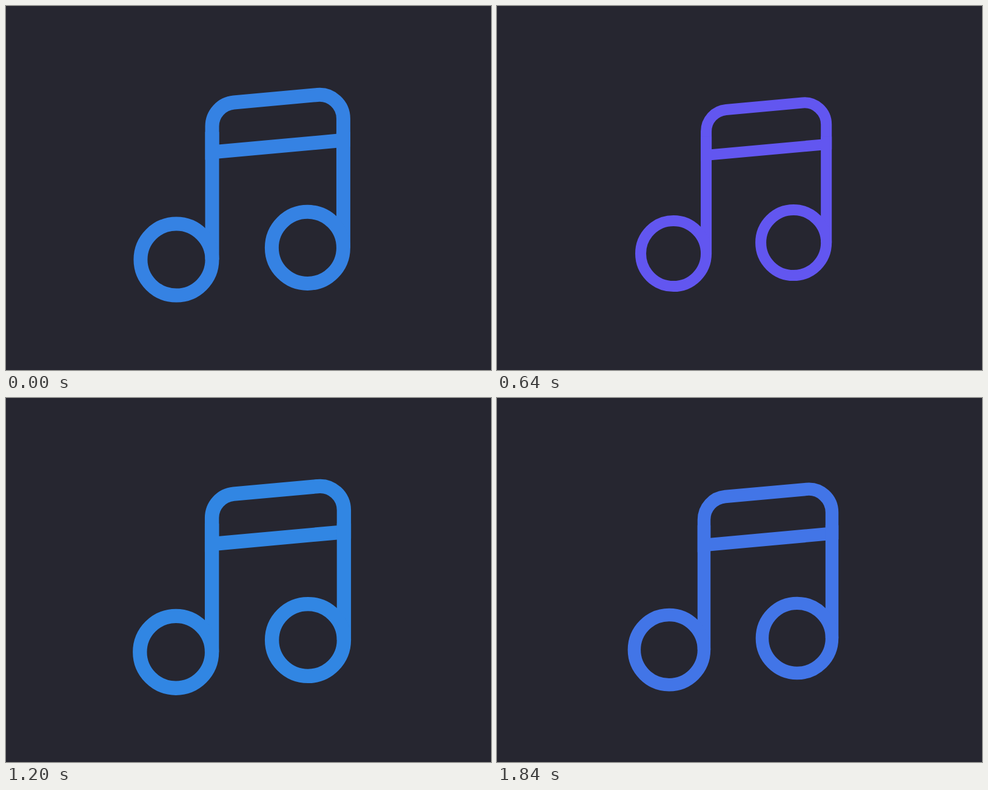
Animation, 800 px wide and 600 px high, one loop 1920 ms. Source, as an HTML page:

```html
<!DOCTYPE html>
<html lang="en">
<head>
<meta charset="utf-8">
<title>Music note</title>
<style>
  html, body { margin: 0; width: 100%; height: 100%; overflow: hidden; background: #262630; }
  svg { display: block; width: 100vw; height: 100vh; }
</style>
</head>
<body>
<svg viewBox="0 0 800 600">
  <g id="note" fill="none">
    <path d="M-61 -60V-103.5A40 40 0 0 1 -24.65 -143.3L115.4 -156.04A40 40 0 0 1 159 -116.2V-80Z"/>
    <path d="M-61 -94V120M159 -94V100"/>
    <circle cx="-121" cy="120" r="60"/>
    <circle cx="99" cy="100" r="60"/>
  </g>
</svg>
<script>
const STEP = 80, PERIOD = 960, PEAK = 134;
const LARGE = { scale: 1, stroke: 24, color: [44, 139, 225] };
const SMALL = { scale: 0.9, stroke: 20, color: [98, 86, 240] };
const note = document.getElementById('note');
const mix = (a, b, k) => a + (b - a) * k;

// Cubic Bezier (.42, 0, .58, 1), solved for x by bisection.
function easeInOut(x) {
  let low = 0, high = 1;
  for (let i = 0; i < 30; i++) {
    const u = (low + high) / 2, v = 1 - u;
    if (3 * v * v * u * 0.42 + 3 * v * u * u * 0.58 + u ** 3 < x) low = u;
    else high = u;
  }
  return low * low * (3 - 2 * low);
}

function draw(ms) {
  const time = Math.floor(ms / STEP) * STEP;
  const phase = (time - PEAK + PERIOD) % PERIOD;
  const k = easeInOut(Math.min(phase, PERIOD - phase) / (PERIOD / 2));
  const color = LARGE.color.map((c, i) => Math.round(mix(c, SMALL.color[i], k)));
  note.setAttribute('transform', `translate(400 300) scale(${mix(LARGE.scale, SMALL.scale, k)})`);
  note.setAttribute('stroke-width', mix(LARGE.stroke, SMALL.stroke, k));
  note.setAttribute('stroke', `rgb(${color})`);
}

const start = performance.now();
function tick() {
  draw(performance.now() - start);
  requestAnimationFrame(tick);
}
tick();
</script>
</body>
</html>
```
